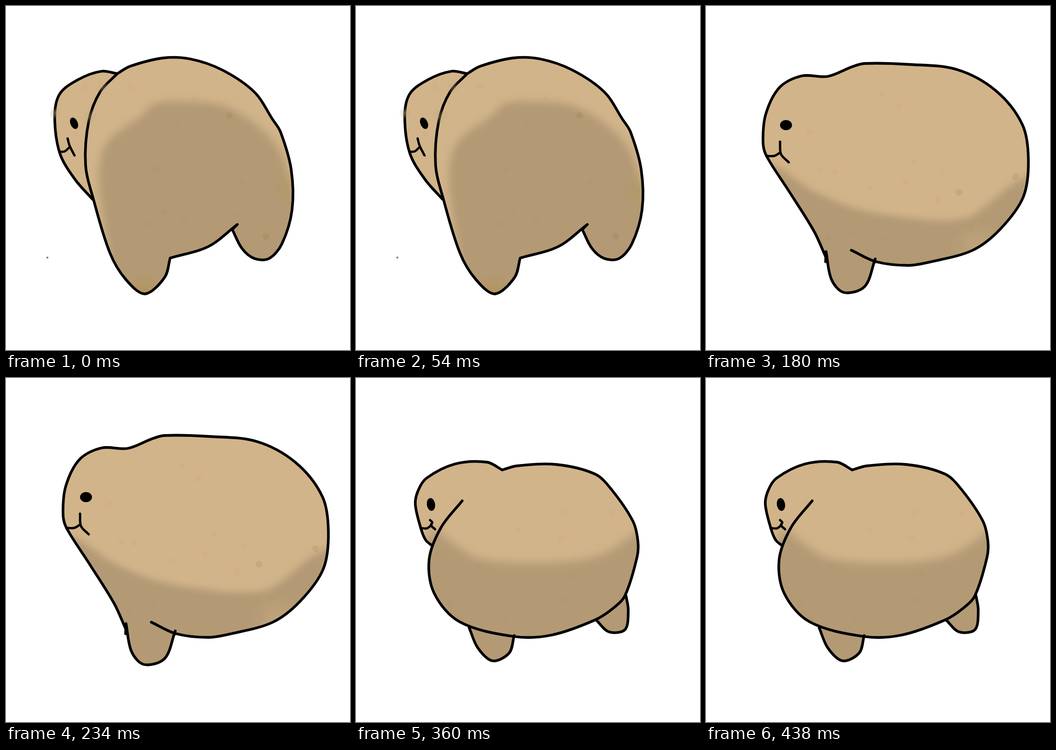
These frames come from a looping animation (748 px wide and 748 px high, 0.49 s). An HTML page with a canvas:

```html
<!DOCTYPE html>
<html lang="en">
<head>
<meta charset="utf-8">
<title>Round creature</title>
<style>
  html, body { margin: 0; width: 100%; height: 100%; overflow: hidden; background: #fff; }
  canvas { display: block; }
</style>
</head>
<body>
<canvas id="stage" width="748" height="748"></canvas>
<script>
const ctx = document.getElementById('stage').getContext('2d');
const SIZE = 748, STEP = 90, LOOP = 490;
const TAN = '#d2b48a', SHADE = '#b39a75';
const FLOOR = '|760,760|-20,760';
const OCHRE = '180,144,80', PALE = '206,174,130', FADED = '190,165,130';

// Key points "x,y" are joined by smooth curves; a bar marks a corner.
// eye: x, y, radii, turn. tints and smudges: x, y, radius, rgb, opacity.
const poses = [
  {
    parts: [
      '242,147 207,142 157,160 117,191 106,240 117,320 150,377 188,420',
      '242,147 270,131 342,113 400,115 470,139 540,187 580,247 597,274 620,355 622,443 600,517 572,549 540,549 513,527 492,486|503,475|440,523 357,548|345,590 302,626 260,594 226,537 190,420 173,345 180,250 205,186 242,147'
    ],
    shade: '225,545 203,400 207,325 230,285 295,238 320,213 370,207 485,221 590,305 630,420' + FLOOR,
    blur: 9,
    tints: [[300, 618, 42, OCHRE, .55], [618, 400, 45, OCHRE, .35]],
    marks: [[486, 238], [565, 501]],
    eye: [148, 255, 8, 13, -.4],
    mouth: ['118,317 128,316 137,308', '134,288 138,303 149,325'],
    smudges: [[107, 233, 14, FADED, .55], [182, 240, 20, FADED, .4], [210, 176, 18, FADED, .4]],
    speck: [90, 547]
  },
  {
    parts: [
      '273,163 218,150 165,173 133,220 129,280 145,348 180,402 223,464 247,488 262,518|266,570 292,605 318,609 350,598 372,538|430,527 510,508 562,498|541,500 531,538 548,553 594,533 630,480 650,400 655,300 632,217 580,160 545,133 500,118 420,117 330,143 273,163'
    ],
    shade: '135,346 160,345 220,294 252,280 275,298 350,321 440,303 515,239 560,223 660,212' + FLOOR,
    blur: 4,
    marks: [[323, 571]],
    eye: [169, 250, 8, 10, -.4],
    mouth: ['138,320 155,315 172,304', '174,298 173,320 180,332'],
    glow: '320,140 420,111 530,120 625,200'
  },
  {
    parts: [
      '316,531 370,556 440,564 490,556 580,531 640,485 690,415 701,335 688,258 630,184 545,138 440,127 345,125 318,132 265,153 208,152 160,177 130,235 124,295 131,325 180,402 235,490 260,545',
      '260,556|261,534|273,595 300,623 345,610 368,550'
    ],
    patch: '261,538|316,525|372,556|364,566|262,562',
    shade: '130,345 160,352 230,400 330,441 470,464 540,465 580,455 665,388 710,365' + FLOOR,
    blur: 8,
    tints: [[590, 528, 60, PALE, .5]],
    marks: [[550, 405], [673, 371]],
    eye: [174, 259, 13, 11, 0],
    mouth: ['131,326 148,326 161,319', '161,295 163,322 180,340']
  },
  {
    parts: [
      '235,346 203,390 183,460 200,525 220,548 265,575 345,606 410,608 490,593 535,575 610,510 640,460 649,395 646,358 633,319 580,245 510,200 430,177 390,173 340,182 320,185 298,179 238,169 175,192 135,235 127,265 131,312 150,357 192,416'
    ],
    shade: '130,345 190,378 208,372 236,355 340,416 400,446 550,442 610,408 660,388' + FLOOR,
    blur: 5,
    tints: [[368, 606, 28, PALE, .8]],
    eye: [173, 278, 9, 14, -.3],
    mouth: ['148,345 163,342 174,332', '163,312 172,332 191,348']
  },
  {
    parts: [
      '246,543 265,587 297,615 333,598 344,560',
      '522,526 550,552 585,547 592,505 587,473',
      '231,267 185,325 159,395 170,468 225,530 343,562 425,559 520,526 560,500 585,473 611,390 613,355 602,311 556,243 520,209 435,188 350,191 318,200|285,183 215,187 153,218 135,245 129,275 142,330 152,353 165,364'
    ],
    shade: '168,325 230,372 270,393 400,402 530,385 625,325' + FLOOR,
    blur: 10,
    eye: [163, 275, 9, 14, -.15],
    mouth: ['140,326 154,327 164,320', '161,309 166,314 163,320 172,329']
  }
];

const distance = (a, b) => Math.hypot(b[0] - a[0], b[1] - a[1]);

// Point reached from b along the tangent of a-b-c, a third of the given length away.
function handle(a, b, c, length) {
  const k = length / 3 / (distance(a, b) + distance(b, c));
  return [b[0] + (c[0] - a[0]) * k, b[1] + (c[1] - a[1]) * k];
}

function curve(text) {
  const path = new Path2D();
  let corner = null;
  for (const run of text.split('|')) {
    const pts = run.split(' ').map(p => p.split(',').map(Number));
    if (corner) pts.unshift(corner);
    else path.moveTo(...pts[0]);
    for (let i = 0; i + 1 < pts.length; i++) {
      const b = pts[i], c = pts[i + 1], a = pts[i - 1] || b, d = pts[i + 2] || c;
      const length = distance(b, c);
      path.bezierCurveTo(...handle(a, b, c, length), ...handle(d, c, b, length), ...c);
    }
    corner = pts.at(-1);
  }
  return path;
}

function stroke(text, width, color = '#000') {
  ctx.lineWidth = width;
  ctx.strokeStyle = color;
  ctx.stroke(curve(text));
}

function fill(text, color) {
  ctx.fillStyle = color;
  ctx.fill(curve(text));
}

function oval(x, y, rx, ry, turn, color) {
  ctx.fillStyle = color;
  ctx.beginPath();
  ctx.ellipse(x, y, rx, ry, turn, 0, Math.PI * 2);
  ctx.fill();
}

const disc = (x, y, r, color) => oval(x, y, r, r, 0, color);

function softDisc(x, y, r, rgb, alpha) {
  const g = ctx.createRadialGradient(x, y, 0, x, y, r);
  g.addColorStop(0, `rgba(${rgb},${alpha})`);
  g.addColorStop(1, `rgba(${rgb},0)`);
  disc(x, y, r, g);
}

function seeded(seed) {
  return () => (seed = seed * 16807 % 2147483647) / 2147483647;
}

// Faint freckles scattered over the skin.
function freckles(seed) {
  const random = seeded(seed);
  for (let i = 0; i < 18; i++) {
    const x = 150 + 480 * random(), y = 170 + 380 * random();
    disc(x, y, 5 + 4 * random(), 'rgba(110,75,20,.02)');
  }
}

function draw(index) {
  const { parts, patch, shade, blur, tints = [], marks = [], eye, mouth, glow, smudges = [], speck } = poses[index];
  ctx.clearRect(0, 0, SIZE, SIZE);
  ctx.lineCap = ctx.lineJoin = 'round';

  parts.forEach(p => fill(p, TAN));
  if (patch) fill(patch, TAN);

  // Shading stays inside the body.
  ctx.globalCompositeOperation = 'source-atop';
  ctx.filter = `blur(${blur}px)`;
  fill(shade, SHADE);
  ctx.filter = 'none';
  tints.forEach(t => softDisc(...t));
  freckles(101 + index);
  marks.forEach(([x, y]) => disc(x, y, 7.5, 'rgba(110,75,20,.1)'));
  ctx.globalCompositeOperation = 'source-over';

  parts.forEach(p => stroke(p, 5.8));
  mouth.forEach(m => stroke(m, 5));
  oval(...eye, '#000');

  if (glow) {
    ctx.filter = 'blur(14px)';
    stroke(glow, 40, 'rgba(205,172,125,.42)');
    ctx.filter = 'none';
    softDisc(395, 112, 45, OCHRE, .25);
  }
  smudges.forEach(s => softDisc(...s));
  if (speck) disc(...speck, 2.2, '#9c8148');
}

let shown = -1;
function tick() {
  const index = Math.min(poses.length - 1, Math.floor(performance.now() % LOOP / STEP));
  if (index !== shown) draw(shown = index);
  requestAnimationFrame(tick);
}
tick();
</script>
</body>
</html>
```
